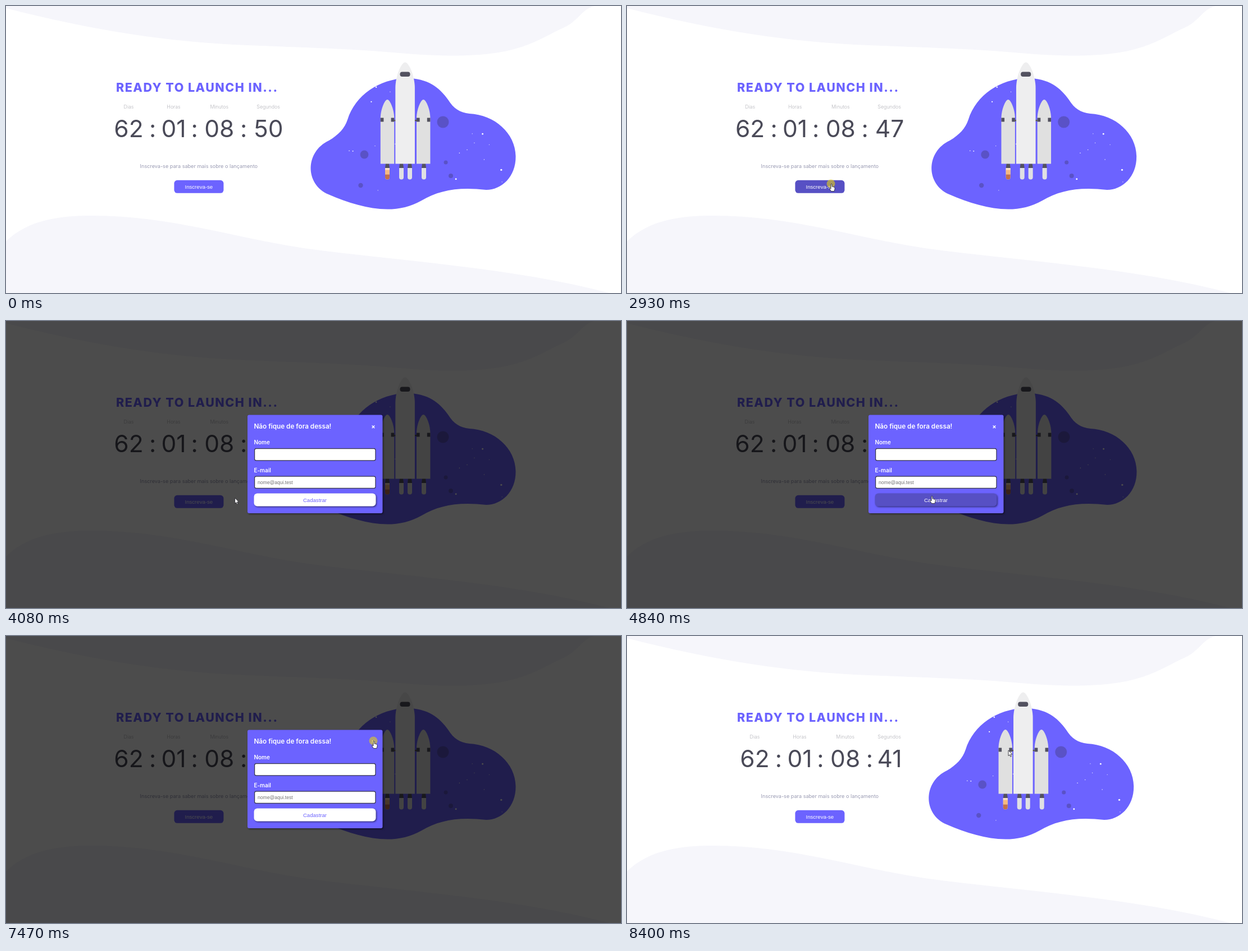
Write an HTML page with a canvas that moves like this. It is 1095 px wide and 512 px high and loops after 8.47 s.

```html
<!DOCTYPE html>
<html lang="pt">
<head>
<meta charset="utf-8">
<title>Ready to launch</title>
<style>
  html, body { margin: 0; width: 100%; height: 100%; overflow: hidden; background: #fff; }
  canvas { display: block; width: 1095px; height: 512px; }
</style>
</head>
<body>
<canvas id="stage" width="1095" height="512"></canvas>
<script>
const ctx = document.getElementById('stage').getContext('2d');
const W = 1095, H = 512, LOOP = 8470;
const PURPLE = '#6c63ff', HOVER = '#5750c4', DARK = '#52515f';
const UI = 'Inter, sans-serif', ARIAL = '"Liberation Sans", Arial, sans-serif';
const DIGITS = '400 42.5px ' + UI;

const OPEN = 3080, SUBMIT = 5140, BLUR = 7330, CLOSE = 7600;
const PRESSES = [[2930, OPEN], [SUBMIT - 150, SUBMIT], [BLUR, CLOSE]];
const ENTRY = { x: 1031, y: 505 };
const MOVES = [
  { from: 570, to: 2140, x: 364, y: 317 },
  { from: 3940, to: 4770, x: 543, y: 312 },
  { from: 5200, to: 6460, x: 655, y: 187 },
  { from: 8110, to: 8400, x: 679, y: 204 }
];

// Clickable boxes: x, y, width, height.
const SIGN_UP = [299.4, 310.8, 88, 23];
const SEND = [441.5, 307.5, 217, 23];
const CROSS = [648, 182, 12, 12];

const WAVES = new Path2D(
  'M0 4C150 42 280 64 430 70S620 77 690 83C900 102 930 68 990 40C1020 27 1022 8 1047 0L0 0Z' +
  'M0 420C40 380 100 374 155 374C290 374 400 412 530 432C700 455 900 466 1074 512L0 512Z');
const BLOB = new Path2D(
  'M712 128.5C752 129 772 146 787 167C797 183 808 190 825 192C870 194 907 227 907.5 268' +
  'C908 305 882 328 855 328C805 322 770 329 740 347C690 376 630 360 574 336' +
  'C532 318 532 260 575 240C592 230 603 218 608 203C622 158 665 131 712 128.5Z');
const ARROW = new Path2D('M0 0V9.8L2.2 7.8L3.8 11.4L5.4 10.7L3.9 7.2L6.8 7Z');
const HAND = new Path2D('M-1 1Q0-1 1 1V5L5 6Q6.5 7 6 10L4.8 13.5H-.5L-3.5 9L-3 7.8L-1 9Z');

const PLANETS = [[778, 207, 10.5], [638, 265, 7.4], [631.5, 320, 4.2], [783, 279, 3.5], [792, 303, 4]];
const STARS = scatterStars(24);

function scatterStars(count) {
  let seed = 11;
  const random = () => (seed = seed * 16807 % 2147483647) / 2147483647;
  const stars = [];
  while (stars.length < count) {
    const x = 550 + random() * 350, y = 135 + random() * 215;
    if (ctx.isPointInPath(BLOB, x, y)) stars.push({ x, y, r: .6 + random() ** 3 });
  }
  return stars;
}

function fill(color) {
  ctx.fillStyle = color;
  ctx.fill();
}

function fillPath(path, color) {
  ctx.fillStyle = color;
  ctx.fill(path);
}

function rect(x, y, w, h, color, r = 0) {
  ctx.beginPath();
  ctx.roundRect(x, y, w, h, r);
  fill(color);
}

function disc(x, y, r, color) {
  ctx.beginPath();
  ctx.arc(x, y, r, 0, 7);
  fill(color);
}

function shape(points, color) {
  ctx.beginPath();
  points.forEach(p => ctx.lineTo(...p));
  fill(color);
}

function text(str, x, y, font, color, align = 'center', spacing = 0) {
  ctx.font = font;
  ctx.letterSpacing = spacing + 'px';
  ctx.textAlign = align;
  ctx.fillStyle = color;
  ctx.fillText(str, x, y);
}

function withShadow(draw) {
  ctx.save();
  ctx.shadowOffsetX = ctx.shadowOffsetY = 1.5;
  ctx.shadowBlur = 3;
  ctx.shadowColor = 'rgba(0,0,0,.5)';
  draw();
  ctx.restore();
}

const over = (p, [x, y, w, h]) => !!p && p.x > x && p.x < x + w && p.y > y && p.y < y + h;

// How much narrower the seconds are than at the start; the layout recentres by it.
function slack(second) {
  ctx.font = DIGITS;
  ctx.letterSpacing = '0px';
  return Math.max(0, ctx.measureText('50').width - ctx.measureText(second).width);
}

function hull(cx, top, half, shoulder, color) {
  const bottom = 281.5, bend = shoulder - (shoulder - top) * .45;
  ctx.beginPath();
  ctx.moveTo(cx - half, bottom);
  ctx.lineTo(cx - half, shoulder);
  ctx.bezierCurveTo(cx - half, bend, cx - half * .4, top, cx, top);
  ctx.bezierCurveTo(cx + half * .4, top, cx + half, bend, cx + half, shoulder);
  ctx.lineTo(cx + half, bottom);
  fill(color);
}

function drawRocket() {
  for (const x of [679, 704, 719, 744]) {
    shape([[x - 3, 281], [x + 3, 281], [x + 4, 289], [x - 4, 289]], DARK);
    rect(x - 4, 289, 8, 20.5, '#e0e0e3', [0, 0, 4, 4]);
  }
  rect(675, 289, 8, 4, '#fbe0c8');
  rect(675, 292.5, 8, 8, '#f5b981');
  rect(675, 300.5, 8, 9, '#c3704c', [0, 0, 4, 4]);
  rect(690, 203, 42, 2.5, DARK);
  for (const x of [679, 743.2]) {
    hull(x, 167, 12.2, 200, '#e0e0e0');
    rect(x - 12.2, 199.5, 5.6, 7, DARK);
    rect(x + 6.6, 199.5, 5.6, 7, DARK);
  }
  hull(710.6, 100.5, 17.3, 146, '#eeeeef');
  rect(701.5, 117.5, 18, 8.5, DARK, 3.8);
}

function drawPicture(dx) {
  ctx.save();
  ctx.translate(dx, 0);
  fillPath(BLOB, PURPLE);
  PLANETS.forEach(p => disc(...p, '#5a52c6'));
  STARS.forEach(s => disc(s.x, s.y, s.r, '#fff'));
  drawRocket();
  ctx.restore();
}

function drawTimer(dx, second) {
  const label = '300 8.8px ' + UI, ink = '#4a4a58', pale = '#b4b4ba';
  const columns = [['Dias', 218.5, '62', 261], ['Horas', 298.5, '01', 335.5], ['Minutos', 379.7, '08', 423]];
  for (const [name, x, digits, colon] of columns) {
    text(name, x + dx, 183, label, pale);
    text(digits, x + dx, 234, DIGITS, ink);
    text(':', colon + dx, 234, DIGITS, ink);
  }
  text('Segundos', 467, 183, label, pale);
  text(second, 467.5, 234, DIGITS, ink);
}

function drawPage(t, cursor) {
  const second = 49 - Math.floor((t - 110) / 1005), spare = slack(second);
  const hover = t < OPEN && over(cursor, SIGN_UP);
  rect(0, 0, W, H, '#fff');
  fillPath(WAVES, '#f6f6fb');
  text('READY TO LAUNCH IN...', 196, 153, '800 21.5px ' + UI, PURPLE, 'left', 1.5);
  drawTimer(spare * 1.1, second);
  text('Inscreva-se para saber mais sobre o lançamento', 343.3, 288.5, '400 9.1px ' + UI, '#9a9bb3');
  rect(...SIGN_UP, hover ? HOVER : PURPLE, 5.5);
  text('Inscreva-se', 343.3, 325.7, '9.6px ' + ARIAL, '#fff');
  drawPicture(-spare * .65);
}

function drawField(y, focused) {
  const edge = focused ? 1.7 : 1.2;
  if (focused) rect(441, y - 1, 218.5, 24.5, '#fff', 4);
  rect(442, y, 216.5, 22.5, focused ? '#101010' : '#35334a', 3.5);
  rect(442 + edge, y + edge, 216.5 - 2 * edge, 22.5 - 2 * edge, '#fff', 2.5);
}

function drawHint(age) {
  ctx.save();
  ctx.globalAlpha = Math.min(1, age / 200);
  withShadow(() => rect(495.5, 255, 110.5, 26, '#fff', 2));
  shape([[501, 255.5], [506, 250], [511, 255.5]], '#fff');
  rect(500.5, 260.5, 13.5, 13.5, '#f99d1c', 1);
  text('!', 507.3, 271.2, '800 10.5px ' + UI, '#fff');
  text('Preencha este campo.', 519, 270.8, '7.9px "Open Sans", sans-serif', '#222', 'left');
  ctx.restore();
}

function drawModal(t, cursor) {
  const focused = t >= SUBMIT && t < BLUR, age = t - SUBMIT;
  const hover = over(cursor, SEND), label = '600 9.9px ' + UI;
  rect(0, 0, W, H, 'rgba(0,0,0,.7)');
  withShadow(() => rect(430, 167.5, 240.5, 175.5, PURPLE, 3));
  text('Não fique de fora dessa!', 441.5, 192.3, '600 11.7px ' + UI, '#fff', 'left');
  text('×', 654, 192, '700 11px ' + UI, '#fff');
  text('Nome', 441.5, 220.3, label, '#fff', 'left');
  drawField(227, focused);
  text('E-mail', 441.5, 269.8, label, '#fff', 'left');
  drawField(276.5, false);
  text('nome@aqui.test', 448, 291, '8.6px ' + ARIAL, '#757575', 'left');
  withShadow(() => rect(...SEND, hover ? HOVER : '#fff', 6));
  text('Cadastrar', 550, 322.7, '9.6px ' + ARIAL, hover ? '#fff' : PURPLE);
  if (!focused) return;
  if (Math.floor(age / 530) % 2 === 0) rect(448, 233, .8, 10, '#111');
  drawHint(age);
}

function cursorAt(t) {
  if (t < MOVES[0].from) return null;
  let { x, y } = ENTRY;
  for (const move of MOVES) {
    const p = Math.max(0, Math.min(1, (t - move.from) / (move.to - move.from)));
    const eased = 1 - (1 - p) ** 1.5;
    x += (move.x - x) * eased;
    y += (move.y - y) * eased;
  }
  return { x, y };
}

function drawCursor(t, cursor) {
  const modal = t >= OPEN && t < CLOSE;
  const targets = modal ? [SEND, CROSS] : [SIGN_UP];
  const icon = targets.some(box => over(cursor, box)) ? HAND : ARROW;
  const pressed = PRESSES.some(([down, up]) => t >= down && t < up);
  if (pressed) disc(cursor.x - 1, cursor.y, 7.5, 'rgba(226,206,24,.6)');
  ctx.save();
  ctx.translate(cursor.x, cursor.y);
  ctx.lineJoin = 'round';
  ctx.lineWidth = .8;
  ctx.strokeStyle = '#1c1c24';
  fillPath(icon, '#fff');
  ctx.stroke(icon);
  ctx.restore();
}

function frame(t) {
  const cursor = cursorAt(t);
  drawPage(t, cursor);
  if (t >= OPEN && t < CLOSE) drawModal(t, cursor);
  if (cursor) drawCursor(t, cursor);
}

const start = performance.now();
function loop() {
  frame((performance.now() - start) % LOOP);
  requestAnimationFrame(loop);
}
loop();
</script>
</body>
</html>
```
